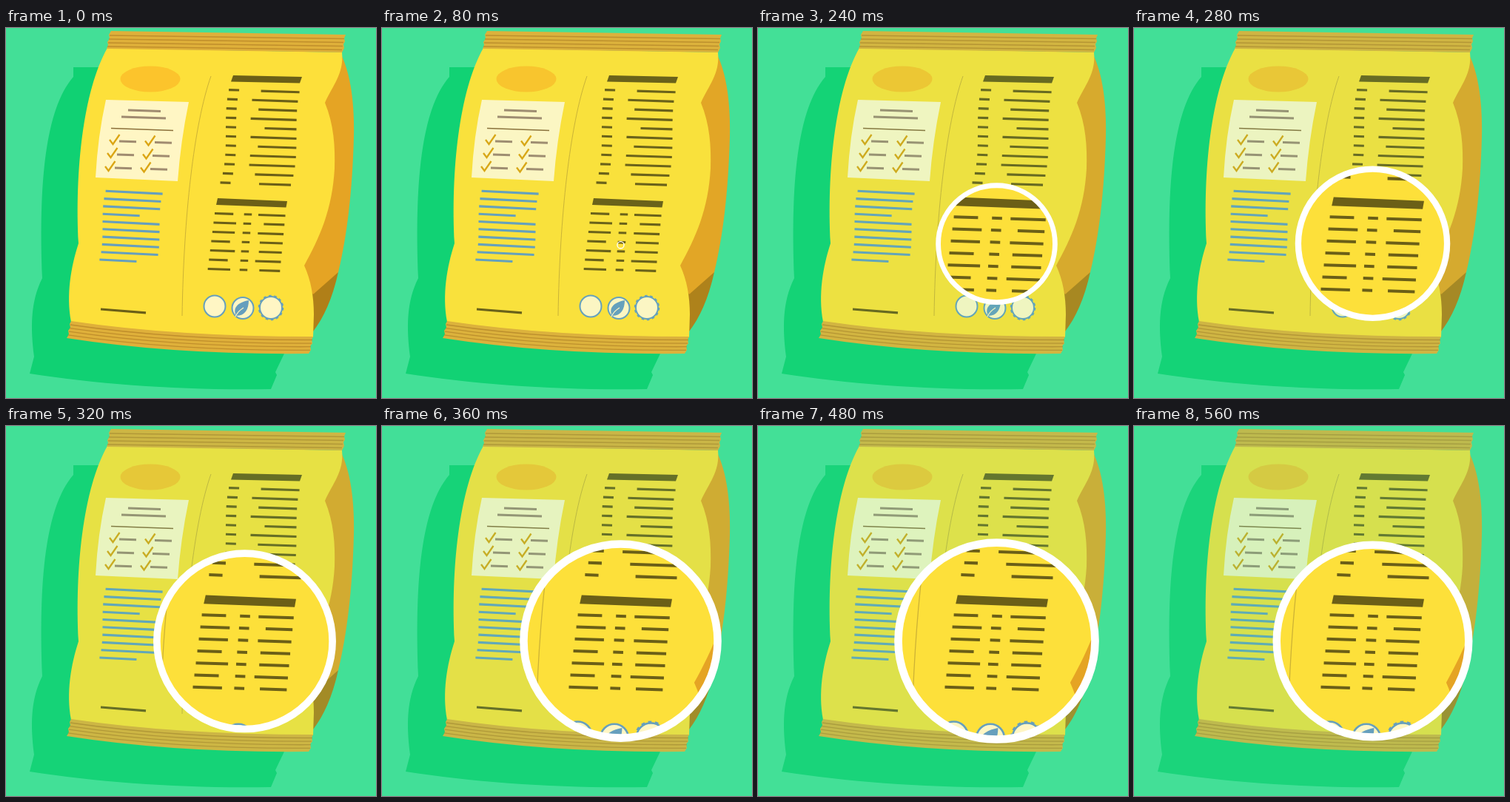
An HTML page that plays this animation: 500 px wide and 500 px high, repeating every 0.6 s.

```html
<!DOCTYPE html>
<html lang="en">
<head>
<meta charset="utf-8">
<title>Label magnifier</title>
<style>
  html, body { margin: 0; height: 100%; overflow: hidden; background: #43df97; }
  svg { display: block; width: 100%; height: 100%; }
  path { fill: none; }
  .dark { stroke: #6b5f17; stroke-width: 3.1; }
  .blue { stroke: #669fbd; stroke-width: 3.1; }
  .grey { stroke: #a08b70; stroke-width: 3; }
  .check { stroke: #dba514; stroke-width: 2.3; }
  .seam { stroke: #c08e2b; stroke-width: 1.3; }
  .badge { fill: #fff6c4; stroke: #669fbd; stroke-width: 2; }
</style>
</head>
<body>
<svg viewBox="0 0 500 500">
  <defs>
    <g id="scene">
      <rect width="500" height="500" fill="#43df97"/>
      <path style="fill:#10d173" d="M91 53H140L376 440L364 465L366 469L358 488C240 490 130 482 32 467L38 444C33 405 33 370 49 338C44 210 53 110 91 66Z"/>
      <!-- side of the bag -->
      <path style="fill:#b07f18" d="M400 362L449 330C441 366 429 392 415 410Z"/>
      <path style="fill:#e5a424" d="M452 34C466 62 471 102 470 148C468 220 461 280 449 330L415 360L395 330L425 100Z"/>
      <!-- front -->
      <path style="fill:#fde03a" d="M137 27L454 33C457 62 441 78 431 101C443 130 445 160 444 190C441 245 424 283 403 321C412 341 416 362 416 387L415 418Q230 420 88 397C81 360 88 322 98 291C93 195 104 85 137 27Z"/>
      <path style="fill:#dfb03a" d="M142 4L459 9L457 14L458 18L456 22L457 27L454 33L136 28L138 23L137 19L140 14L139 9Z"/>
      <path style="fill:#dfb03a" d="M88 396Q230 417 415 417L413 421L414 426L411 430L412 435L409 440Q230 442 82 419L85 414L84 409L87 405L86 400Z"/>
      <g id="seams"></g>
      <ellipse cx="195" cy="69" rx="40.500" ry="17.500" fill="#fcc42c"/>
      <path stroke="#cdb235" d="M277 65C254 130 240 255 238 389"/>
      <path style="fill:#fff6c4" d="M135 97L247 100Q236 153 232 207L121 202Q124 146 135 97Z"/>
      <path stroke="#8b6f3a" stroke-width="1.600" d="M142 135.500L226 138.500"/>
      <path style="fill:#6b5f17" d="M307 64L400 66L397 74.500L304 72.500Z"/>
      <path style="fill:#6b5f17" d="M286 230L380 234L378.500 242.500L284 239Z"/>
      <g id="print"></g>
      <circle class="badge" cx="282" cy="376" r="14.500"/>
      <circle class="badge" cx="320" cy="378.500" r="14.500"/>
      <circle class="badge" cx="358" cy="378" r="15"/>
      <circle cx="358" cy="378" r="16" fill="none" stroke="#669fbd" stroke-width="2.500" stroke-dasharray="3.600"/>
      <path style="fill:#669fbd" d="M328 368C312 371 306 379 311 389C323 389 328 380 328 368Z"/>
      <path stroke="#fff6c4" stroke-width="1.200" d="M310 390Q313 383 321 378"/>
    </g>
    <clipPath id="lens"><circle class="lens" cx="322.500"/></clipPath>
  </defs>
  <use href="#scene"/>
  <rect id="veil" width="500" height="500" fill="#43df97"/>
  <g id="zoom">
    <g clip-path="url(#lens)">
      <use href="#scene" transform="matrix(1.3 0 0 1.3 -102 -70.5)"/>
    </g>
    <circle id="ring" class="lens" cx="322.500" fill="none" stroke="#fff"/>
  </g>
</svg>
<script>
const $ = id => document.getElementById(id);
const FRAME = 40, LOOP = 600, START = 80, PEAK = 400;

function addPath(parent, cls, d) {
  const p = document.createElementNS('http://www.w3.org/2000/svg', 'path');
  p.setAttribute('class', cls);
  p.setAttribute('d', d);
  $(parent).append(p);
}

const dash = (cls, x, y, length, slope = 0.033) =>
  addPath('print', cls, `M${x} ${y}l${length} ${length * slope}`);

// Sideways drift of a text row that follows the curve of the bag.
const bend = i => -0.045 * (i - 4.5) ** 3;

for (let k = 0; k < 4; k++) {
  addPath('seams', 'seam', `M${140 - k} ${10 + k * 5}L${457 - k} ${14.5 + k * 5}`);
  addPath('seams', 'seam',
    `M${87 - k} ${401 + k * 4.6}Q230 ${422 + k * 4.8} ${414 - k} ${421.5 + k * 4.6}`);
}

// Checklist
dash('grey', 165, 111, 44);
dash('grey', 156, 120, 60);
for (let row = 0; row < 3; row++) {
  for (let col = 0; col < 2; col++) {
    const x = 140 - row * 3 + col * 48, y = 151 + row * 18 + col * 1.5;
    addPath('print', 'check', `M${x} ${y}l4.5 6l9 -13`);
    dash('grey', x + 13, y + 2, 23);
  }
}

// Paragraphs
for (let i = 0; i < 10; i++)
  dash('blue', 130.5 + bend(i), 220.3 + i * 10.3, i % 6 === 3 ? 50 : 77, 0.05);
dash('dark', 128, 380, 61, 0.08);

// Upper table: left-aligned labels, right-aligned ragged values
for (let i = 0; i < 11; i++) {
  const y = 83.6 + i * 12.53;
  const value = i % 6 === 4 ? 43 : 52 + 10 * (Math.floor(i * 1.125) % 2);
  dash('dark', 297 + bend(i), y, 14);
  dash('dark', 392.5 + bend(i) - value, y + 3.2 - value * 0.033, value);
}

// Lower table
for (let i = 0; i < 7; i++) {
  const y = 250.5 + i * 12.5;
  const value = 32 + 4.5 * Math.cos(i * 6 * Math.PI / 7);
  dash('dark', 282 - i * 1.55, y, 29 + 4.5 * Math.cos(2.5 * (i - 4)));
  dash('dark', 321.7 - i, y + 1.2, 10.5);
  dash('dark', 377.5 - i * 1.2 - value, y + 2, value);
}

// Eases out to the peak, then slowly shrinks.
const lensRadius = t => t <= PEAK
  ? 71 * (1 - Math.cos(Math.PI * Math.min(1, (t - 34) / 374)))
  : 141.7 - (t - PEAK) * 0.042;

function draw(now) {
  const t = Math.floor(now % LOOP / FRAME) * FRAME;
  const open = t >= START;
  $('zoom').style.display = open ? '' : 'none';
  $('veil').setAttribute('opacity', open ? (t - 35) * 0.0004 : 0);
  if (!open) return;
  const outer = lensRadius(t), stroke = 1 + outer * 0.07;
  for (const circle of document.querySelectorAll('.lens')) {
    circle.setAttribute('r', Math.max(0, outer - stroke / 2));
    circle.setAttribute('cy', 293.3 - outer * 0.02);
  }
  $('ring').setAttribute('stroke-width', stroke);
}

const begin = performance.now();
function tick() {
  draw(performance.now() - begin);
  requestAnimationFrame(tick);
}
tick();
</script>
</body>
</html>
```
